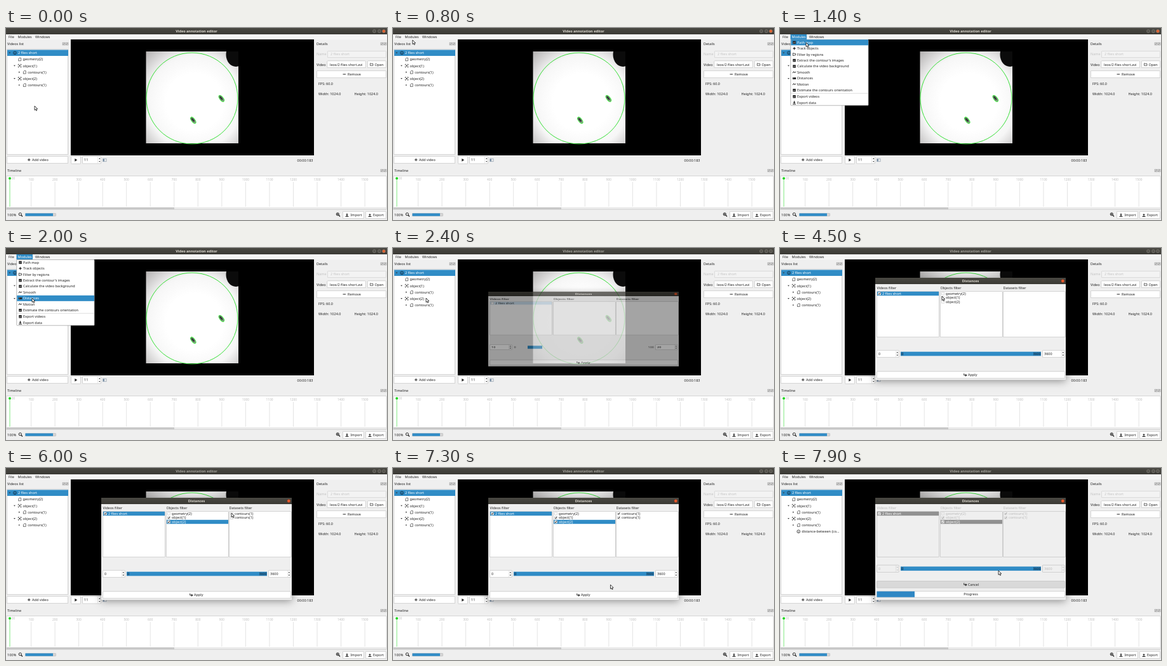
Write an HTML page with a canvas that moves like this. It is 600 by 303 pixels and loops after 8 s.

```html
<!DOCTYPE html>
<html>
<head>
<meta charset="utf-8">
<title>Video annotation editor</title>
<style>
html, body { margin: 0; width: 600px; height: 303px; overflow: hidden; }
canvas { display: block; }
</style>
</head>
<body>
<canvas id="stage" width="600" height="303"></canvas>
<script>
const main = document.getElementById('stage').getContext('2d');
const layer = Object.assign(document.createElement('canvas'), { width: 600, height: 303 }).getContext('2d');
let g = main;

const LOOP = 8000, BLUE = '#308cc6', INK = '#222', GREY = '#bbb', BG = '#efefef', EDGE = '#c2c2c2', GREEN = '#38e038';
const T = { menu: 1100, pick: 2150, open: 2300, ready: 2510, video: 3700, obj1: 4700, obj2: 5200, set1: 6250, set2: 6600, apply: 7500 };

// time, x, y of the pointer tip
const PATH = [
  [0, 45, 123], [200, 45, 123], [900, 30, 13], [1150, 31, 14], [1400, 41, 23], [2000, 41, 79], [2200, 41, 79],
  [2400, 52, 79], [2700, 56, 78], [3200, 155, 72], [3800, 155, 72], [4400, 255, 76], [4800, 255, 76],
  [5100, 255, 83], [5400, 255, 83], [5900, 355, 71], [6300, 355, 71], [6500, 355, 77], [6700, 355, 77],
  [7200, 345, 171], [7400, 340, 197], [7550, 340, 197], [7850, 344, 162], [8000, 344, 162]
];

function pointer(t) {
  const i = Math.max(1, PATH.findIndex(k => k[0] > t));
  const [a, x, y] = PATH[i - 1], [b, u, v] = PATH[i];
  const p = (t - a) / (b - a), e = p * p * (3 - 2 * p);
  return [x + (u - x) * e, y + (v - y) * e];
}

function rect(x, y, x2, y2, color) {
  g.fillStyle = color;
  g.fillRect(x, y, x2 - x, y2 - y);
}
function box(x, y, x2, y2, fill = '#fff', edge = EDGE) {
  g.fillStyle = edge;
  g.beginPath();
  g.roundRect(x, y, x2 - x, y2 - y, 1.5);
  g.fill();
  rect(x + .7, y + .7, x2 - .7, y2 - .7, fill);
}
function text(s, x, y, color = INK, align = 'left', size = 5.5, weight = 400) {
  g.font = `${weight} ${size}px "Noto Sans", "Open Sans", sans-serif`;
  g.textAlign = align;
  g.fillStyle = color;
  g.fillText(s, x, y);
}
function line(points, color = INK, width = .8) {
  g.strokeStyle = color;
  g.lineWidth = width;
  g.beginPath();
  points.forEach(([x, y]) => g.lineTo(x, y));
  g.stroke();
}
function disc(x, y, r, fill, stroke, width = .8) {
  g.beginPath();
  g.arc(x, y, r, 0, 7);
  if (fill) { g.fillStyle = fill; g.fill(); }
  if (stroke) { g.strokeStyle = stroke; g.lineWidth = width; g.stroke(); }
}
function oval(x, y, rx, ry, fill) {
  g.beginPath();
  g.ellipse(x, y, rx, ry, 0, 0, 7);
  g.fillStyle = fill;
  g.fill();
}
function poly(points, fill, stroke) {
  g.beginPath();
  points.forEach(([x, y]) => g.lineTo(x, y));
  g.closePath();
  g.fillStyle = fill;
  g.fill();
  if (stroke) { g.strokeStyle = stroke; g.lineWidth = .8; g.stroke(); }
}
function frame(x, y, w, h, color = INK) {
  g.strokeStyle = color;
  g.lineWidth = .8;
  g.strokeRect(x, y, w, h);
}
function zoomIcon(x, y, plus) {
  disc(x - .7, y - .7, 2.1, null, INK, 1);
  line([[x + .8, y + .8], [x + 3, y + 3]], INK, 1.3);
  if (plus) {
    line([[x - 2, y - .7], [x + .6, y - .7]]);
    line([[x - .7, y - 2], [x - .7, y + .6]]);
  }
}
function arrowIcon(x, y, dir) {
  line([[x, y - 2.5 * dir], [x, y + .5]], INK, 1.2);
  poly([[x - 2, y - .3 * dir], [x + 2, y - .3 * dir], [x, y + 2 * dir]], INK);
  rect(x - 2.5, y + 2, x + 2.5, y + 3, INK);
}
function dockIcons(x, y) {
  for (const u of [x, x + 5]) {
    frame(u - 1.8, y - 1.8, 3.6, 3.6, '#999');
    line([[u - 1, y + 1], [u + 1, y - 1]], '#777');
  }
}
function spin(x, x2, y, value, color = INK, fill = '#fff') {
  box(x, y, x2, y + 12, fill);
  rect(x2 - 5.5, y + 1, x2 - 5, y + 11, '#d0d0d0');
  text(value, x + 3, y + 8, color);
  const m = x2 - 2.7;
  poly([[m - 1.2, y + 4.4], [m + 1.2, y + 4.4], [m, y + 2.8]], color);
  poly([[m - 1.2, y + 7.6], [m + 1.2, y + 7.6], [m, y + 9.2]], color);
}

function titleBar(x, y, x2, h, label, color) {
  const grad = g.createLinearGradient(0, y, 0, y + h);
  grad.addColorStop(0, '#4a4943');
  grad.addColorStop(1, '#3a3934');
  rect(x, y, x2, y + h, grad);
  text(label, (x + x2) / 2, y + 6.8, color, 'center', 5.5, 700);
}

function treeIcon(kind, x, y, color) {
  if (kind === 'file') {
    g.strokeStyle = '#555';
    line([[x - 1.8, y + 2.3], [x - 1.8, y - 1], [x - .5, y - 2.2], [x + 2, y - 2.2], [x + 2, y + 2.3], [x - 2.2, y + 2.3]], '#555');
  } else if (kind === 'object') {
    for (const [a, b] of [[-1, -1], [1, -1], [1, 1], [-1, 1]])
      line([[x + a * 2.3, y + b], [x + a * 2.3, y + b * 2.3], [x + a, y + b * 2.3]]);
    disc(x, y, 1.1, INK);
  } else {
    disc(x, y, 2.4, null, color);
    line([[x, y - .6], [x, y + 1.4]], color);
  }
}
function tree(t) {
  box(1, 33, 98, 200);
  rect(2, 34.5, 98, 44, BLUE);
  const rows = [
    [0, '2 flies short', 'info', 1], [1, 'geometry(2)', 'file'], [1, 'object(1)', 'object', 1],
    [2, 'contours(1)', 'file', 2], [1, 'object(2)', 'object', 1], [2, 'contours(1)', 'file', 2]
  ];
  if (t >= T.apply) rows.push([2, 'distance-between (co…', 'info']);
  rows.forEach(([level, label, icon, arrow], i) => {
    const x = 19 + level * 7.6, y = 39.3 + i * 10.15, color = i ? INK : '#fff';
    text(label, x, y + 2, color);
    treeIcon(icon, x - 5, y, i ? INK : '#123');
    const a = x - 13.2;
    if (arrow === 1) poly([[a - 1.4, y - .8], [a + 1.4, y - .8], [a, y + .9]], '#333');
    if (arrow === 2) poly([[a - .8, y - 1.4], [a - .8, y + 1.4], [a + .9, y]], '#333');
  });
}

function fly(x, y) {
  g.save();
  g.translate(x, y);
  g.rotate(.9);
  oval(0, 0, 5.8, 2.6, '#8a958a');
  g.strokeStyle = GREEN;
  g.lineWidth = 1;
  g.stroke();
  oval(-.8, 0, 3.6, 1.5, '#343c38');
  g.restore();
}
function video() {
  rect(102, 18, 485, 201, '#000');
  g.save();
  g.beginPath();
  g.rect(220.5, 37, 145.5, 145);
  g.clip();
  const glow = g.createRadialGradient(297, 117, 45, 297, 117, 111);
  glow.addColorStop(0, '#fff');
  glow.addColorStop(.45, '#f6f6f6');
  glow.addColorStop(1, '#b2b0b0');
  rect(220, 37, 366, 182, glow);
  oval(362, 42, 15.5, 19, '#0b0b0b');
  g.restore();
  disc(293, 111, 72, null, GREEN, 1);
  fly(339.3, 111.3);
  fly(294.8, 145.6);
}

function timeline() {
  text('Timeline', 2, 227);
  dockIcons(592, 225);
  box(0, 233, 599.5, 287);
  for (let i = 1; i <= 15; i++) {
    const x = 2 + i * 37.54;
    text(i * 100, x, 240.7, GREY, 'center', 4.8);
    line([[x, 243], [x, 282]], '#dcdcdc', .8);
  }
  line([[6, 236], [6, 282]], '#7fe87f', 1);
  disc(6, 237.3, 2, '#1fd61f');
  text('00', 9, 239.3, GREY, 'left', 4.5);
  rect(1, 283, 599, 286, '#e9e9e9');
  rect(1, 283, 265, 286, '#c8c8c8');
  text('100%', 2, 297);
  zoomIcon(23, 294.5);
  box(30, 292, 79, 297.3, '#d5d5d5');
  rect(30.5, 292.5, 74, 296.8, BLUE);
  zoomIcon(523, 294.5, true);
  box(530, 289, 564, 301);
  arrowIcon(537, 295, 1);
  text('Import', 542.5, 297);
  box(566, 289, 599, 301);
  arrowIcon(573, 295, -1);
  text('Export', 578, 297);
}

function details() {
  text('Details', 489, 27);
  dockIcons(592, 25);
  text('Name', 489, 43, '#c4c4c4');
  box(506, 36, 599, 47, '#f3f3f3', '#d0d0d0');
  text('2 flies short', 511, 43, '#c4c4c4');
  text('Video', 489, 59.5);
  box(505.5, 51.5, 567, 63);
  text('leos/2 flies short.avi', 510, 59.5);
  box(569, 51.5, 599, 63);
  poly([[573.5, 55.8], [575, 55.8], [575.8, 56.5], [578, 56.5], [578, 59.3], [573.5, 59.3]], '#fff', '#444');
  text('Open', 580.5, 59.5);
  box(489, 67, 599, 79);
  rect(530.5, 72.5, 535, 73.5, INK);
  text('Remove', 538, 75);
  text('FPS: 60.0', 492, 90.4);
  text('Width: 1024.0', 492, 105.7);
  text('Height: 1024.0', 548.5, 105.7);
}

function editor(t) {
  const modal = t >= T.open;
  rect(0, 0, 600, 303, BG);
  titleBar(0, 0, 600, 10, 'Video annotation editor', modal ? '#a5a39c' : '#dfdbd2');
  [580, 588, 595].forEach((x, i) => disc(x, 5, 2.5, i === 2 && !modal ? '#e2612f' : '#55534d', '#85837b', .6));
  rect(0, 10, 600, 18.3, '#f5f5f5');
  const over = t >= 850 && t < T.pick;
  if (over) rect(16.5, 10, 42, 18.3, BLUE);
  text('File', 4, 15.6);
  text('Modules', 18.5, 15.6, over ? '#fff' : INK);
  text('Windows', 46, 15.6);
  text('Videos list', 2, 27);
  dockIcons(91, 25);
  tree(t);
  box(1, 202, 98, 214);
  line([[34, 208], [38.4, 208]], INK, 1);
  line([[36.2, 205.8], [36.2, 210.2]], INK, 1);
  text('Add video', 41, 210);
  video();
  box(102, 202, 118, 214.5);
  poly([[108.3, 205.9], [108.3, 210.7], [112.2, 208.3]], INK);
  spin(120, 150, 202.3, '11');
  frame(152.6, 206.3, 5.4, 4.4, '#9aa7b5');
  rect(153, 206.6, 155, 210.5, '#7d92a8');
  text('00:00:183', 483.5, 210.8, INK, 'right');
  details();
  timeline();
}

const MENU = ['Path map', 'Track objects', 'Filter by regions', "Extract the contour's images",
  'Calculate the video background', 'Smooth', 'Distances', 'Motion', 'Estimate the contours orientation',
  'Export videos', 'Export data'];
function menu(y) {
  box(16.5, 18, 139.5, 122.5, '#fff', '#999');
  rect(17, 102.8, 139, 103.4, '#c9c9c9');
  MENU.forEach((label, i) => {
    const c = 22.8 + i * 9.42 + (i > 8 ? .6 : 0), on = Math.abs(y - c) < 4.7;
    if (on) rect(17.3, c - 4.5, 139, c + 4.5, BLUE);
    text(label, 27, c + 1.9, on ? '#fff' : INK);
    const x = 22.5;
    if (i === 10) arrowIcon(x, c, 1);
    else if (i === 1) { disc(x, c, 1.2, INK); line([[x - 2.4, c], [x + 2.4, c]]); line([[x, c - 2.4], [x, c + 2.4]]); }
    else if (i === 2) line([[x - 2.2, c - 2], [x - 2.2, c + 2], [x + 2.2, c + 1], [x + 2.2, c - 1], [x - 2.2, c - 2]]);
    else if (i === 5 || i === 7) line([[x - 2.5, c + 1.2], [x - .8, c - 1.2], [x + .8, c + 1], [x + 2.5, c - 1.2]], INK, 1);
    else if (i === 6) { rect(x - 2.6, c - 1.3, x + 2.6, c + 1.6, INK); line([[x - 1, c - .8], [x - 1, c + .5]], '#ddd', .6); }
    else {
      rect(x - 2.3, c - 2.2, x + 2.3, c + 2.3, INK);
      line([[x - 1.6, c + 1.4], [x - .4, c - .2], [x + .4, c + .7], [x + 1.5, c - .5]], '#ddd', .6);
    }
  });
}

// items: [label, checked, selected]
function checkList(x, label, items, off, opening) {
  text(label, x + .5, 65, off ? GREY : INK);
  box(x, 68, x + 98.7, 141, off ? BG : '#fff');
  items.forEach(([name, checked, selected], i) => {
    const y = 72 + i * 6.5;
    if (selected) rect(x + 1, y - 3.2, x + 98, y + 3.2, off ? '#919191' : opening ? '#cfe4f3' : BLUE);
    const plain = selected && !opening ? '#fff' : off ? GREY : INK;
    rect(x + 2.2, y - 2.3, x + 6.8, y + 2.3, off ? '#cfcfcf' : '#bdbdbd');
    rect(x + 2.7, y - 1.8, x + 6.3, y + 1.8, off ? BG : '#fff');
    if (checked) line([[x + 3.2, y], [x + 4.2, y + 1.2], [x + 5.9, y - 1.4]], off ? '#999' : '#111', 1);
    text(name, x + 9, y + 1.9, plain);
  });
}

function rangeRow(y, off, opening) {
  const ink = off ? GREY : INK, fill = off ? BG : '#fff';
  const [low, high] = opening ? ['10', '20'] : ['0', '3600'];
  spin(152, 187.5, y, low, ink, fill);
  spin(413, 448.5, y, high, ink, fill);
  if (opening) {
    rect(212, y + 3, 235, y + 9.3, BLUE);
    text('0', 190.5, y + 8, '#555');
    text('100', 411, y + 8, '#555', 'right');
    return;
  }
  rect(190, y + 2.7, 411, y + 9.3, BLUE);
  rect(190.5, y + 3.5, 194.5, y + 8.6, '#2b78ad');
  rect(399, y + 3.5, 410.7, y + 8.6, '#2b78ad');
  text('0', 191.2, y + 8, '#0e3046', 'left', 5.2);
  text('3600', 410.4, y + 8, '#0e3046', 'right', 5.2);
}

function dialog(t) {
  const off = t >= T.apply, opening = t < T.ready;
  g.save();
  g.shadowColor = 'rgba(0,0,0,.42)';
  g.shadowBlur = 12;
  g.shadowOffsetY = 1;
  rect(150, 47, 450, 208.5, BG);
  g.restore();
  titleBar(150, 47, 450, 10, 'Distances', '#dfdbd2');
  disc(445.3, 52, 2.7, '#e5582c', '#2d2c28', .5);

  const one = t >= T.obj1, two = t >= T.obj2;
  checkList(152, 'Videos filter', [['2 flies short', t >= T.video, true]], off, opening);
  checkList(252, 'Objects filter', t < T.video ? [] :
    [['geometry(2)'], ['object(1)', one, one && !two], ['object(2)', two, two]], off);
  const sets = [];
  if (one) sets.push(['contours(1)', t >= T.set1]);
  if (two) sets.push(['contours(1)', t >= T.set2]);
  checkList(351, 'Datasets filter', sets, off);
  rangeRow(off ? 152.8 : 161, off, opening);

  const y = off ? 178 : 194.5;
  box(152, y, 449, y + 11.5, off ? '#d9d9d9' : '#fff');
  line([[289.8, y + 3.5], [289.8, y + 6.3], [293, y + 6.3]], INK, 1);
  poly([[292, y + 4.2], [292, y + 8.4], [294.6, y + 6.3]], INK);
  text(off ? 'Cancel' : 'Apply', 296, y + 7.8);
  if (off) {
    box(152, 194, 449, 204.5);
    rect(152.5, 194.7, 152 + 60 * Math.min(1, (t - T.apply) / 400), 203.8, '#2f87c4');
    text('Progress', 300.5, 201.2, INK, 'center');
  }
}

function showDialog(t) {
  const p = Math.min(1, (t - T.open) / (T.ready - T.open)), s = 1 - (1 - p) ** 2;
  g = layer;
  g.clearRect(0, 0, 600, 303);
  dialog(t);
  g = main;
  g.save();
  g.translate(0, 128 * (1 - s));
  g.scale(1, s);
  // the shadow also darkens what shows through the fading window
  rect(150, 47, 450, 208.5, `rgba(0,0,0,${.45 * s})`);
  g.globalAlpha = s ** 1.4;
  g.drawImage(layer.canvas, 0, 0);
  g.restore();
}

function draw(now) {
  const t = now % LOOP, [x, y] = pointer(t);
  editor(t);
  if (t >= T.menu && t < T.pick) menu(y);
  if (t > T.open) showDialog(t);
  const shape = [[0, 0], [0, 6.6], [1.5, 5.2], [2.6, 7.6], [3.7, 7.1], [2.7, 4.8], [4.7, 4.7]];
  poly(shape.map(([a, b]) => [x + a, y + b]), '#fff', '#111');
  requestAnimationFrame(draw);
}
requestAnimationFrame(draw);
</script>
</body>
</html>
```
